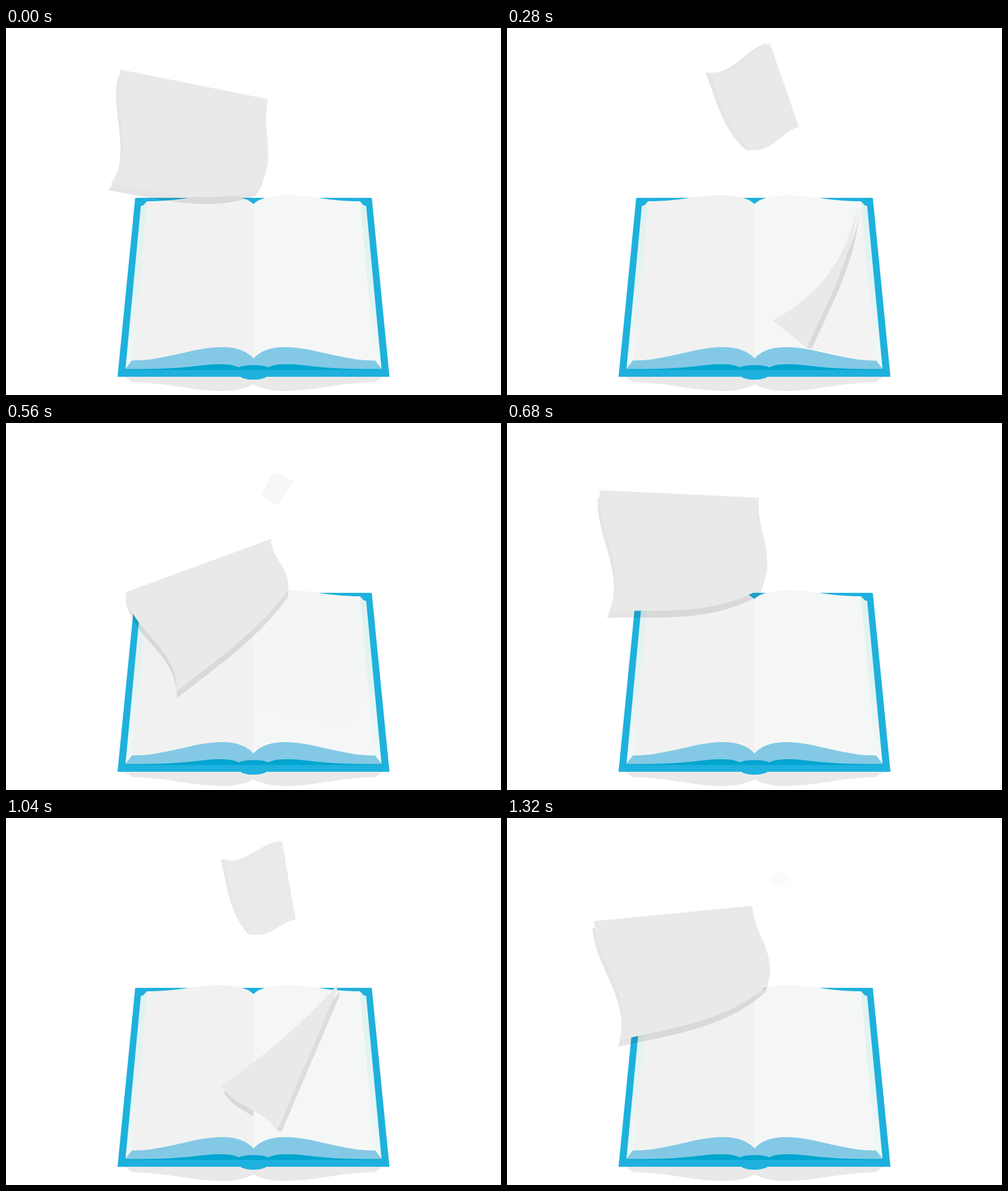
An HTML page with a canvas for the animation above (1360 ms loop, 870 by 644 pixels).

```html
<!DOCTYPE html>
<html lang="en">
<head>
<meta charset="utf-8">
<title>Turning pages</title>
<style>
  html, body { margin: 0; width: 100%; height: 100%; overflow: hidden; background: #fff; }
  canvas { display: block; width: 870px; height: 644px; }
</style>
</head>
<body>
<canvas id="stage" width="870" height="644"></canvas>
<script>
const LOOP = 1360, STEP = 40, START = 815, END = 2010;
const ctx = document.getElementById('stage').getContext('2d');

// Sheet poses: age, then corners A B C D.
const POSES = [
  [840, 592, 563, 624, 320, 624, 316, 600, 578],
  [940, 467, 513, 613, 328, 615, 316, 527, 561],
  [1040, 378, 469, 585, 290, 579, 308, 476, 549],
  [1100, 293, 422, 521, 259, 541, 297, 421, 548],
  [1320, 153, 181, 431, 154, 458, 293, 198, 390],
  [1340, 163, 118, 443, 131, 446, 291, 179, 330],
  [1360, 201, 73, 461, 125, 442, 283, 184, 273],
  [1500, 322, 13, 498, 140, 424, 258, 241, 156],
  [1640, 462, 27, 513, 173, 427, 214, 356, 78],
  [1700, 485, 41, 509, 178, 431, 203, 383, 72],
  [1800, 518, 87, 490, 176, 435, 166, 447, 74],
  [1980, 499, 107, 472, 126, 460, 109, 481, 91]
];

const ramp = (t, from, to) => Math.min(1, Math.max(0, (t - from) / (to - from)));

// Cubic Hermite through the poses with central-difference tangents.
function poseAt(time) {
  const last = POSES.length - 1;
  const t = Math.min(time, POSES[last][0]);
  const found = POSES.findIndex(k => k[0] > t);
  const i = found < 0 ? last : Math.max(1, found);
  const a = POSES[i - 1], b = POSES[i];
  const prev = POSES[i - 2] || a, next = POSES[i + 1] || b;
  const d = b[0] - a[0], s = (t - a[0]) / d, s2 = s * s, s3 = s2 * s;
  return a.slice(1).map((v, k) => {
    const j = k + 1;
    const m0 = (b[j] - prev[j]) / (b[0] - prev[0]) * d;
    const m1 = (next[j] - a[j]) / (next[0] - a[0]) * d;
    return (2 * s3 - 3 * s2 + 1) * v + (s3 - 2 * s2 + s) * m0
      + (3 * s2 - 2 * s3) * b[j] + (s3 - s2) * m1;
  });
}

// Edge from p to q; u and v push the two handles towards the inside.
function edge(path, [px, py], [qx, qy], u, v) {
  const dx = qx - px, dy = qy - py;
  path.bezierCurveTo(
    px + dx / 3 - dy * u, py + dy / 3 + dx * u,
    px + dx * 2 / 3 - dy * v, py + dy * 2 / 3 + dx * v,
    qx, qy);
}

function fill(path, color) {
  ctx.fillStyle = color;
  ctx.fill(path);
}

function mirrored(draw) {
  draw();
  ctx.save();
  ctx.translate(870, 0);
  ctx.scale(-1, 1);
  draw();
  ctx.restore();
}

const cover = new Path2D('M228 298H435.3V612H196L227 299Z');
const spine = new Path2D('M411 611C418 619 451 619 459 611Z');
const ground = new Path2D('M208 612L222 621.5C280 622 330 637 380 637C407 637 426 631 435.3 625V612Z');
const side = new Path2D('M237 312Q242 312 244 308L248 304H260V583H222L210 598Z');
const page = new Path2D('M248 304C310 304 326 293.5 375 293.5C405 293.5 425 299 435 309V580C425 569 408 560 380 560C330 560 285 583 222 583.5Z');
const rightPage = new Path2D();
rightPage.addPath(page, new DOMMatrix().translate(870, 0).scale(-1, 1));
const block = new Path2D('M222 580H435.3V600H210V598Z');
const dark = new Path2D('M210 598.5C330 599 335 590 378 590C395 590 404 593 409 595.5C417 592 426 591.5 435.3 591.5V600H210Z');
const blockTop = new Path2D('M222 583.5C285 583 330 560 380 560C408 560 425 569 435.3 580V590H222Z');

const sideTint = ctx.createLinearGradient(0, 305, 0, 598);
sideTint.addColorStop(0, '#e0f2f1');
sideTint.addColorStop(.45, '#e2f3f2');
sideTint.addColorStop(1, '#f1f8f7');

function drawBook() {
  mirrored(() => fill(ground, '#e9e9e9'));
  mirrored(() => fill(cover, '#1eb1dd'));
  fill(spine, '#1eb1dd');
  mirrored(() => {
    fill(side, sideTint);
    ctx.save();
    ctx.beginPath();
    ctx.moveTo(222, 583.5);
    ctx.lineTo(222, 540);
    ctx.lineTo(435.3, 540);
    ctx.lineTo(435.3, 600);
    ctx.lineTo(210, 600);
    ctx.lineTo(210, 598);
    ctx.clip();
    fill(blockTop, '#83c9e5');
    ctx.beginPath();
    ctx.rect(210, 583.5, 225.3, 16.5);
    ctx.fill();
    ctx.restore();
    fill(dark, '#00a5d0');
  });
  fill(rightPage, '#f5f7f7');
  fill(page, '#f1f1f1');
}

function rightOf(path, c, d) {
  path.moveTo(c[0], c[1]);
  path.lineTo(c[0] + 300, c[1] - 60);
  path.lineTo(d[0] + 300, d[1] + 60);
  path.lineTo(d[0], d[1]);
  path.closePath();
}

function drawSheet(age, under) {
  if (age <= START || age >= END) return;
  const [ax, ay, bx, by, cx, cy, dx, dy] = poseAt(age);
  const a = [ax, ay], b = [bx, by], c = [cx, cy], d = [dx, dy];
  const settle = 1 - ramp(age, 1800, 1980);
  const curl = (.2 * ramp(age, 940, 1100) + .03 * ramp(age, 1360, 1500)) * settle;
  const tip = (.2 - .15 * ramp(age, 1100, 1320)) * ramp(age, 940, 1100) * settle;
  const bow = (.17 * ramp(age, 1040, 840) + .13 * ramp(age, 1100, 1320)) * settle;
  const outer = .15 * ramp(age, 1080, 940) * ramp(age, 700, 900);
  const opacity = 1 - ramp(age, 1680, 2045);
  const sx = 4 * ramp(age, 800, 940) - 8 * ramp(age, 1100, 1360)
    - 3 * ramp(age, 1360, 1500) + 7 * ramp(age, 1640, 1980);
  const sy = 12 * (ramp(age, 800, 940) - ramp(age, 1420, 1640));

  const sheet = new Path2D();
  sheet.moveTo(ax, ay);
  edge(sheet, a, b, outer, outer);
  edge(sheet, b, c, tip, -curl);
  edge(sheet, c, d, -bow, -bow * .3);
  edge(sheet, d, a, curl, -tip);
  sheet.closePath();

  if (under && age > 880 && age < 1280) {
    const area = new Path2D();
    rightOf(area, c, d);
    ctx.save();
    ctx.clip(rightPage);
    ctx.globalAlpha = ramp(age, 1280, 1160);
    fill(area, '#f3f3f3');
    ctx.restore();
  }

  ctx.save();
  if (age < 1200) {
    // The turning page casts no shadow on itself.
    const area = new Path2D();
    area.rect(0, 0, 435, 644);
    rightOf(area, c, d);
    ctx.clip(area);
  }
  ctx.translate(sx, sy);
  fill(sheet, `rgba(0,0,0,${.1 * opacity})`);
  ctx.restore();

  const tone = Math.round(255 - 22 * opacity);
  fill(sheet, `rgb(${tone},${tone},${tone})`);
}

function frame() {
  const t = Math.floor(performance.now() % LOOP / STEP) * STEP;
  ctx.clearRect(0, 0, 870, 644);
  drawBook();
  drawSheet(t < START ? t + LOOP : t, false);
  drawSheet(t + 660, true);
  requestAnimationFrame(frame);
}
frame();
</script>
</body>
</html>
```
